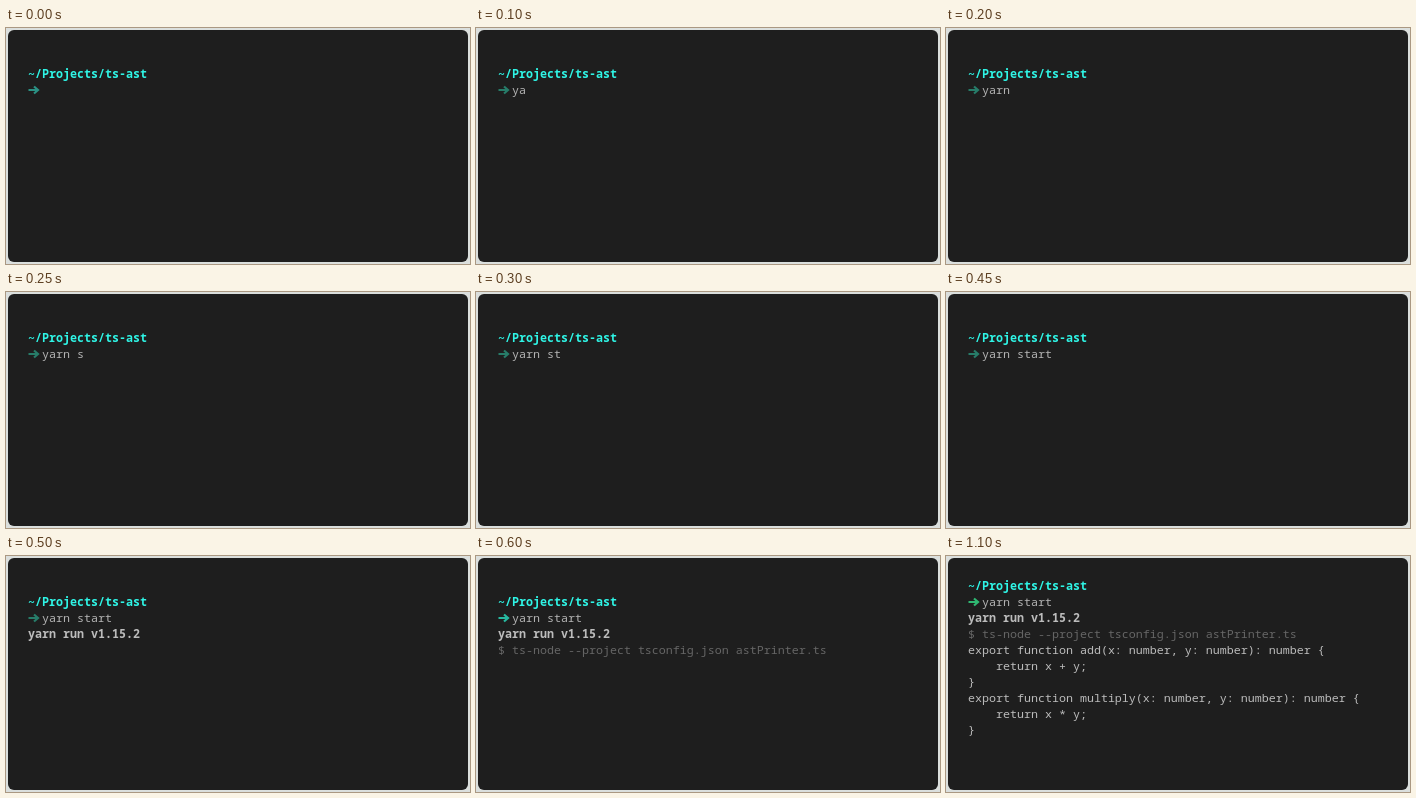
Recreate the animation shown at these times as an HTML page with a canvas. Size 464 by 236 pixels, loop 6.1 s.

```html
<!DOCTYPE html>
<html lang="en">
<head>
<meta charset="utf-8">
<title>Terminal</title>
<style>
html, body { margin: 0; width: 100%; height: 100%; overflow: hidden; background: #dbdfdd; }
canvas { display: block; }
</style>
</head>
<body>
<canvas id="stage" width="464" height="236"></canvas>
<script>
const ctx = document.getElementById('stage').getContext('2d');
const LOOP = 6100, KEY = 50, LEFT = 22, ROW = 16, CHAR = 7;
const COMMAND = 'yarn start';
const OUTPUT = [
  'export function add(x: number, y: number): number {',
  '    return x + y;',
  '}',
  'export function multiply(x: number, y: number): number {',
  '    return x * y;',
  '}'
];

function print(text, x, y, color, weight = 400) {
  ctx.font = `${weight} 11.667px "Noto Sans Mono", "DejaVu Sans Mono", monospace`;
  ctx.fillStyle = color;
  ctx.fillText(text, x, y);
}

function arrow(y, color) {
  ctx.strokeStyle = color;
  ctx.lineWidth = 2.2;
  ctx.beginPath();
  ctx.moveTo(LEFT + 0.5, y);
  ctx.lineTo(LEFT + 9.5, y);
  ctx.moveTo(LEFT + 6, y - 3.5);
  ctx.lineTo(LEFT + 10, y);
  ctx.lineTo(LEFT + 6, y + 3.5);
  ctx.stroke();
}

function arrowColor(t) {
  if (t >= 1100) return '#2fb872';
  if (t >= 600) return '#27b8a0';
  return t < KEY ? '#2b9184' : '#277c69';
}

function draw(t) {
  ctx.clearRect(0, 0, 464, 236);
  ctx.fillStyle = '#1e1e1e';
  ctx.beginPath();
  ctx.roundRect(2, 2, 460, 232, 6);
  ctx.fill();

  const done = t >= 1100;
  const top = done ? 34 : 50; // the finished output scrolls up one row
  const row = n => top + n * ROW;

  print('~/Projects/ts-ast', LEFT, row(0), '#2ff5e6', 700);
  arrow(row(1) - 4, arrowColor(t));
  // the space and the letter before it each take one key beat, except "n" and " "
  const keys = Math.floor(t / KEY);
  const typed = keys > 4 ? keys + 1 : keys;
  print(COMMAND.slice(0, typed), LEFT + 2 * CHAR, row(1), '#b4b4b4');
  if (t >= 500) print('yarn run v1.15.2', LEFT, row(2), '#bcbcbc', 700);
  if (t >= 600) print('$ ts-node --project tsconfig.json astPrinter.ts', LEFT, row(3), '#666');
  if (done) OUTPUT.forEach((line, i) => print(line, LEFT, row(4 + i), '#bcbcbc'));
}

function tick(now) {
  draw(now % LOOP);
  requestAnimationFrame(tick);
}
draw(0);
requestAnimationFrame(tick);
</script>
</body>
</html>
```
